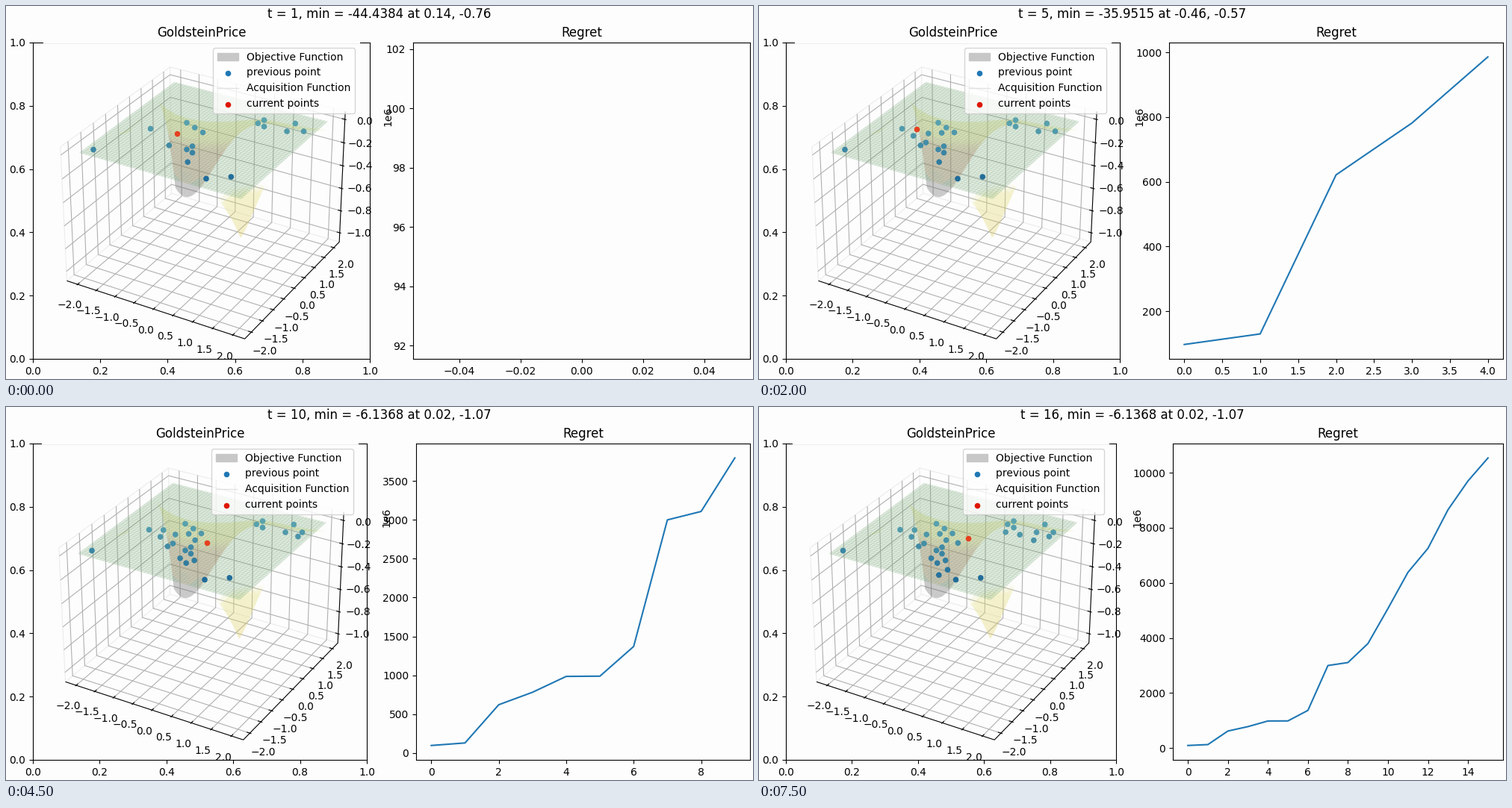
These frames come from a looping animation (1000 by 500 pixels, 8 s). A matplotlib script:

```python
import numpy as np
import matplotlib.pyplot as plt
from matplotlib.animation import FuncAnimation
from matplotlib.collections import LineCollection, PolyCollection
from matplotlib.colors import LinearSegmentedColormap
from matplotlib.lines import Line2D
from matplotlib.patches import Patch, Rectangle

W, H = 1000, 500
PAPER = "#fdfdfd"
BLUE, RED = "#1f77b4", "#de1600"

# Camera: elevation 30, azimuth -60, distance 10, result in stage pixels
ELEV, AZIM = np.radians([30, -60])
RIGHT = np.array([-np.sin(AZIM), np.cos(AZIM), 0])
OUT = np.array([np.cos(ELEV) * np.cos(AZIM), np.cos(ELEV) * np.sin(AZIM),
                np.sin(ELEV)])
UP = np.cross(OUT, RIGHT)
SCALE, CX, CY = 424 / 0.185, 267.2, 255.2
B, BZ = 0.5952, 0.4464          # half sizes of the box
XY, Z, Z0 = B / 2.2917, 0.775, 0.394


def project(p):
    p = np.asarray(p, float)
    d = 10 - p @ OUT
    return np.stack([CX + SCALE * (p @ RIGHT) / d,
                     CY - SCALE * (p @ UP) / d], -1)


def world(x, y, z):
    return np.stack([x * XY, y * XY, Z0 + Z * z], -1)


def goldstein_price(x, y):
    u, d = x + y, 2 * x - 3 * y
    return ((1 + (u + 1)**2 * (19 - 14 * u + 3 * u**2))
            * (30 + d**2 * (18 - 16 * d + 3 * d**2)))


def mesh(height, n=51):
    """Quads of a height field, farthest first, with their mean height."""
    x, y = np.meshgrid(np.linspace(-2, 2, n), np.linspace(-2, 2, n))
    p = world(x, y, height(x, y))
    quads = np.stack([p[:-1, :-1], p[:-1, 1:], p[1:, 1:], p[1:, :-1]], 2)
    quads = quads.reshape(-1, 4, 3)
    quads = quads[np.argsort(quads.mean(1) @ OUT)]
    return project(quads), (quads[:, :, 2].mean(1) - Z0) / Z


DEPTH_COLORS = LinearSegmentedColormap.from_list("depth", [
    (0, "#e2de6e00"), (0.06, "#e2de6e00"), (0.1, "#e2de6e59"),
    (0.34, "#e0cc6059"), (0.48, "#be785a59"), (0.76, "#b46e5a59"),
    (0.85, "#69696959"), (1, "#69696959")])


def row(start, end, n):
    return np.linspace(start, end, n)


def ring(cx, cy, rx, ry, phase):
    a = np.radians(phase + np.array([0, 120, 240]))
    return np.stack([cx + rx * np.cos(a), cy + ry * np.sin(a)], -1)


# Starting design on the stage, then the evaluated (x, y) of every step
START = np.vstack([
    row((193.5, 164.5), (268, 231.5), 4), row((242, 156.5), (263.5, 169.5), 3),
    row((117, 192.5), (301.3, 229), 2), ring(247, 192.3, 5, 5, 180),
    ring(342.8, 157.3, 5.5, 5, 180), ring(387.3, 164.5, 13, 7, 30)])
X, Y = np.array([
    (-.63, -.18), (-.46, -.57), (-.39, -.005), (-.86, -.44),
    (-.97, -.13), (.02, -1.07), (-.12, -.19), (1.76, 1.1),
    (.335, -1), (.17, -.175), (.58, -1.33), (.535, -1.62),
    (1.16, .85), (.83, .8), (1.55, .77), (.24, .14)]).T
VALUE = goldstein_price(X, Y)
STEPS = project(world(X, Y, -VALUE / 1e6))
REGRET = np.cumsum(VALUE - 3)   # the global minimum is 3


def best(t):
    if t < 2:
        return "-44.4384 at 0.14, -0.76"
    if t < 6:
        return "-35.9515 at -0.46, -0.57"
    return "-6.1368 at 0.02, -1.07"


def point_colors(pts):
    """Points get paler towards the back."""
    k = np.clip((pts[:, 1:] - 154) / 78, 0, 1)
    far, near = np.array([90, 163, 174]), np.array([32, 107, 153])
    return (far + (near - far) * k) / 255


fig = plt.figure(figsize=(W / 100, H / 100), dpi=100, facecolor=PAPER)
frame = fig.add_subplot(1, 2, 1, facecolor=PAPER)
plot = fig.add_subplot(1, 2, 2, facecolor=PAPER)
scene = fig.add_axes([0, 0, 1, 1])


def place(ax, left, right, top=49, bottom=473):
    ax.set_position([left / W, 1 - bottom / H, (right - left) / W,
                     (bottom - top) / H])


# 3D scene, drawn in pixel coordinates
scene.set(xlim=(49.5, 473.5), ylim=(473, 49), xticks=[], yticks=[])
scene.patch.set_visible(False)
scene.spines[:].set_visible(False)
scene.set_title("GoldsteinPrice")
scene.add_patch(Rectangle((49.5, 46), 424, 4, fc=PAPER, ec="none",
                          clip_on=False, zorder=0))


def add_lines(paths, color, zorder):
    scene.add_collection(LineCollection(
        [project(p) for p in paths], colors=color, linewidths=0.8,
        zorder=zorder, clip_on=False), autolim=False)


ticks = np.arange(-2, 2.1, 0.5) * XY
zticks = Z0 - Z * np.arange(0, 1.01, 0.2)

panes = [
    [(-B, -B, -BZ), (-B, B, -BZ), (-B, B, BZ), (-B, -B, BZ), (-B, -B, -BZ)],
    [(-B, B, -BZ), (B, B, -BZ), (B, B, BZ), (-B, B, BZ)]]
add_lines(panes, "#ececec", 1)

grid = [[(t, -B, -BZ), (t, B, -BZ), (t, B, BZ)] for t in ticks]
grid += [[(B, t, -BZ), (-B, t, -BZ), (-B, t, BZ)] for t in ticks]
grid += [[(-B, -B, z), (-B, B, z), (B, B, z)] for z in zticks]
add_lines(grid, "#b0b0b0", 1.1)

inner, outer = B - 0.0198, B + 0.0099
edges = [[(-B, -B, -BZ), (B, -B, -BZ), (B, B, -BZ), (B, B, BZ)]]
edges += [[(t, -inner, -BZ), (t, -outer, -BZ)] for t in ticks]
edges += [[(inner, t, -BZ), (outer, t, -BZ)] for t in ticks]
edges += [[(inner, B, z), (outer, B, z)] for z in zticks]
add_lines(edges, "black", 1.2)


def label(x, y, value, ha="center"):
    text = f"{value:.1f}".replace("-", "\u2212")
    scene.text(x, y + 5, text, ha=ha, va="baseline")


for k in range(9):
    bend = k * (k - 1)
    label(85 + 25 * k + 0.14 * bend, 400 + 8.25 * k + 0.055 * bend, k / 2 - 2)
    label(346 + 14.98 * k - 0.203 * bend, 461.5 - 15.64 * k + 0.172 * bend,
          k / 2 - 2)
for k in range(6):
    label(491.5 - 0.45 * k, 154.3 + 29.95 * k, 0 - k / 5, "right")
scene.text(511, 147.5, "1e6", rotation=90, ha="center", va="center")

quads, level = mesh(lambda x, y: -goldstein_price(x, y) / 1e6)
scene.add_collection(PolyCollection(
    quads, facecolors=DEPTH_COLORS(-level / 1.02), edgecolors="none",
    linewidths=0, zorder=2), autolim=False)
quads, _ = mesh(lambda x, y: 0 * x)
scene.add_collection(PolyCollection(
    quads, facecolors=(0.47, 0.67, 0.47, 0.2),
    edgecolors=(0.47, 0.65, 0.47, 0.2), linewidths=0.4, zorder=2.1),
    autolim=False)


def dots(color, zorder=4):
    return scene.scatter([], [], s=20, color=color, zorder=zorder)


previous, current = dots(BLUE), dots("#e5401f", 4.1)
scene.legend(
    handles=[Patch(color="#c7c7c7"), dots(BLUE),
             Line2D([], [], color="#e2e2e2", lw=1), dots(RED)],
    labels=["Objective Function", "previous point",
            "Acquisition Function", "current points"],
    loc="upper right", facecolor="white", framealpha=0.8)

# Regret plot
plot.set_title("Regret")
curve, = plot.plot([], [], color=BLUE, lw=1.5)
heading = fig.text(0.5, 1 - 16 / H, "", fontsize=12, ha="center",
                   va="baseline")


def update(i):
    t = i + 1
    # Wider tick labels on the right squeeze both halves
    gap = 0 if t < 5 else 4 if t < 15 else 9
    place(frame, 36, 487 - gap)
    place(plot, 545 + gap, 996)
    place(scene, 49.5 - gap / 2, 473.5 - gap / 2)

    heading.set_text(f"t = {t}, min = {best(t)}")
    old = np.vstack([START, STEPS[:i]])
    previous.set_offsets(old)
    previous.set_color(point_colors(old))
    current.set_offsets(STEPS[i:t])

    curve.set_data(range(t), REGRET[:t])
    plot.relim()
    plot.autoscale_view()
    return previous, current, curve, heading


anim = FuncAnimation(fig, update, frames=16, interval=500, repeat=True,
                     repeat_delay=0, blit=False)
plt.show()
```
